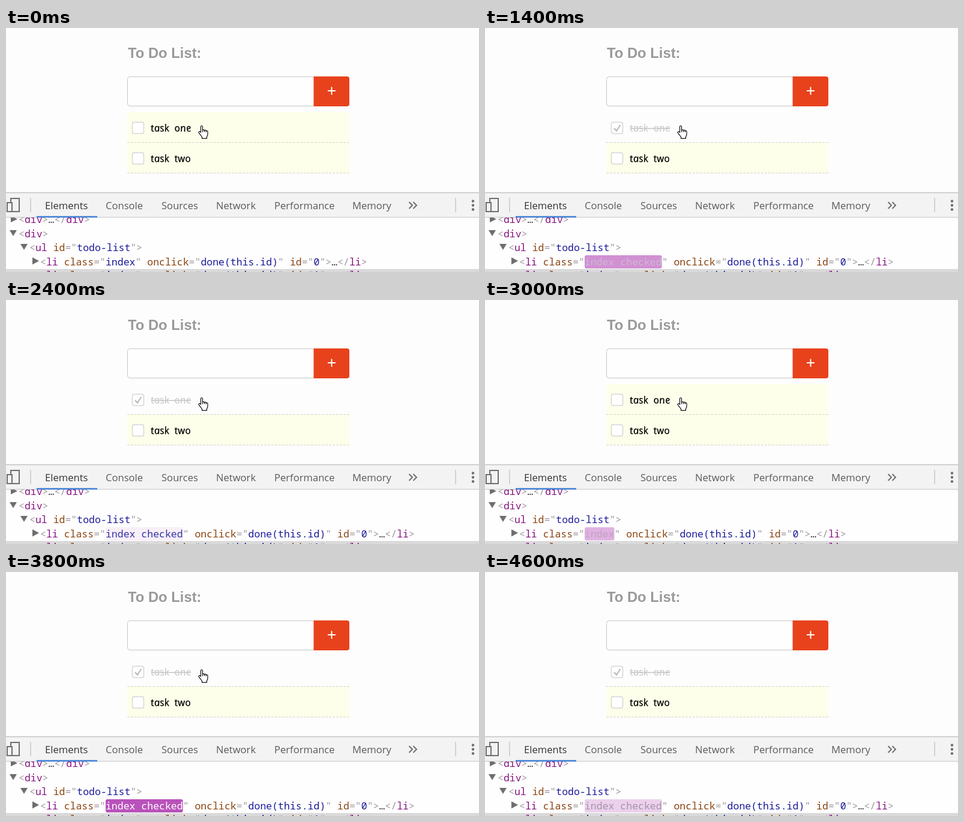
Animation of 788x408 px, one loop 4800 ms. Source, as an HTML page:

```html
<!DOCTYPE html>
<html lang="en">
<head>
<meta charset="utf-8">
<title>To do list with element inspector</title>
<style>
  html, body { margin: 0; width: 100%; height: 100%; overflow: hidden; background: #fdfdfd; }
  svg { display: block; width: 788px; height: 408px; }
  text { white-space: pre; }
  .title { font: bold 23.8px "Liberation Sans", Arial, sans-serif; fill: #999; }
  /* Upright italic gives round, handwritten letters */
  .task { font: italic 16.5px "Open Sans", sans-serif; letter-spacing: .3px; word-spacing: 4px; fill: #000; stroke: currentColor; stroke-width: .3; }
  .tabs { font: 16.6px "Open Sans", "Noto Sans", sans-serif; fill: #5a5a5a; }
  .tabs .on { fill: #333; }
  .code { font: 16.5px "Noto Sans Mono", monospace; fill: #9c969c; }
  .tag { fill: #881280; }
  .attr { fill: #8a4310; }
  .val { fill: #1a1a9a; }
  .dots { fill: #333; }
  .box { fill: #fff; stroke: #d6d6d6; stroke-width: 1.5; }
  .dash { stroke: #d6d6c2; stroke-dasharray: 4 2; }
  .line { fill: none; stroke: #6e6e6e; stroke-width: 2; }
</style>
</head>
<body>
<svg viewBox="0 0 788 408">
  <!-- page -->
  <text class="title" x="203" y="50">To Do List:</text>
  <rect x="202.5" y="81.5" width="320" height="49" rx="4" fill="#fefefe" stroke="#c6c6c6"/>
  <path d="M512.500 81h55.500a4 4 0 0 1 4 4v42a4 4 0 0 1-4 4h-55.500z" fill="#e8421c"/>
  <path d="M536 105h13M542.500 98.500v13" stroke="#fff" stroke-width="2"/>

  <rect id="row" x="202" y="141" width="370" height="50" fill="#feffea"/>
  <rect x="202" y="192" width="370" height="50" fill="#feffea"/>
  <path class="dash" d="M202 191.500h370M202 242.500h370"/>
  <rect class="box" x="210.5" y="157.5" width="19" height="19" rx="3"/>
  <rect class="box" x="210.5" y="208.5" width="19" height="19" rx="3"/>
  <text class="task" id="task" transform="translate(242 173) skewX(10)">task one</text>
  <text class="task" transform="translate(242 224) skewX(10)">task two</text>
  <g id="done" fill="none" stroke="#c6c6c6">
    <path d="M215 167.500l4 4.500 6.500-10" stroke="#b8b8b8" stroke-width="2"/>
    <path d="M242 168h66" stroke-width="1.500"/>
  </g>

  <!-- element tree -->
  <rect y="317" width="788" height="91" fill="#fefefe"/>
  <rect y="403" width="788" height="5" fill="#dadada"/>
  <path d="M8 314l11 5.500-11 5.500zM6 338h12l-6 10zM24 361h12l-6 10zM44 383.500l11 6-11 6z" fill="#6e6e6e"/>
  <rect id="flash" x="166" y="380" height="22" rx="3" fill="#ab30ac"/>
  <g class="code">
    <text x="21" y="326">&lt;<tspan class="tag">div</tspan>&gt;<tspan class="dots">…</tspan>&lt;/<tspan class="tag">div</tspan>&gt;</text>
    <text x="21" y="350">&lt;<tspan class="tag">div</tspan>&gt;</text>
    <text x="39" y="373">&lt;<tspan class="tag">ul</tspan> <tspan class="attr">id</tspan>="<tspan class="val">todo-list</tspan>"&gt;</text>
    <text x="57" y="397">&lt;<tspan class="tag">li</tspan> <tspan class="attr">class</tspan>="<tspan class="val" id="cls">index</tspan>" <tspan class="attr">onclick</tspan>="<tspan class="val">done(this.id)</tspan>" <tspan class="attr">id</tspan>="<tspan class="val">0</tspan>"&gt;<tspan class="dots">…</tspan>&lt;/<tspan class="tag">li</tspan>&gt;</text>
    <text x="57" y="419">&lt;<tspan class="tag">li</tspan> <tspan class="attr">class</tspan>="<tspan class="val">index</tspan>" <tspan class="attr">onclick</tspan>="<tspan class="val">done(this.id)</tspan>" <tspan class="attr">id</tspan>="<tspan class="val">1</tspan>"&gt;<tspan class="dots">…</tspan>&lt;/<tspan class="tag">li</tspan>&gt;</text>
  </g>

  <!-- toolbar -->
  <rect y="275" width="788" height="42" fill="#f3f3f3"/>
  <path d="M0 275.500h788" stroke="#b0b0b0"/>
  <path d="M0 316.500h788" stroke="#c4c4c4"/>
  <rect x="51" y="314.500" width="101" height="2.500" fill="#3f7fd6"/>
  <path d="M41 284v24M749 284v24" stroke="#c8c8c8" stroke-width="1.500"/>
  <path class="line" d="M8 291v-6h14v22h-11M2 292h8v15h-8z"/>
  <path class="line" d="M671.500 291l5.500 5.500-5.500 5.500M678.500 291l5.500 5.500-5.500 5.500"/>
  <g fill="#6e6e6e"><circle cx="778" cy="289.500" r="2.200"/><circle cx="778" cy="296.500" r="2.200"/><circle cx="778" cy="303.500" r="2.200"/></g>
  <g class="tabs">
    <text class="on" x="65" y="303">Elements</text>
    <text x="166" y="303">Console</text>
    <text x="259" y="303">Sources</text>
    <text x="350" y="303">Network</text>
    <text x="447" y="303">Performance</text>
    <text x="577" y="303">Memory</text>
  </g>

  <!-- pointer -->
  <g id="hand" stroke="#111" stroke-width="1.200" stroke-linejoin="round">
    <path fill="#fff" d="M324.500 165q0-1.500 1.500-1.500t1.500 1.500v5.500q1.500-1 3 .5 1.500-.800 2.800.700 2.700-.500 2.700 2v4q0 2-1.500 4v3h-8v-2.500l-5-6.500q-1-2 .5-2.500 1.200-.300 2.500 1.500z"/>
    <path fill="none" d="M327.500 170.500v3.500M330.500 171v3M333.300 171.700v2.500"/>
  </g>
</svg>
<script>
const LOOP = 4800, STEP = 200, CHAR = 9.9;
const [row, task, done, flash, cls, hand] =
  ['row', 'task', 'done', 'flash', 'cls', 'hand'].map(id => document.getElementById(id));

// Fade of the changed attribute, one entry per step since the change
const glow = [.83, .53, .37, .28, .22, .13, .07];
const ink = ['#fff', '#cdb9d4', '#bfa2c2', '#b09bb5', '#a594ab', '#6c64a8', '#3434a4'];
const changes = [1200, 2600, 3800];

const show = (el, on) => el.style.visibility = on ? 'visible' : 'hidden';
const within = (t, a, b) => t >= a && t < b;

function draw(now) {
  const t = Math.floor(now % LOOP / STEP) * STEP;
  const checked = within(t, 800, 2600) || t >= 3800;
  show(row, !checked);
  show(done, checked);
  task.style.fill = task.style.color = checked ? '#cdcdcd' : '#000';

  const name = within(t, 1200, 2600) || t >= 3800 ? 'index checked' : 'index';
  if (cls.textContent !== name) cls.textContent = name;
  const last = changes.filter(c => c <= t).pop();
  const age = (t - last) / STEP;
  flash.setAttribute('width', name.length * CHAR);
  flash.style.opacity = glow[age] || 0;
  cls.style.fill = ink[age] || '#1a1a9a';

  show(hand, t < 4400);
}

const start = performance.now();
function tick() {
  draw(performance.now() - start);
  requestAnimationFrame(tick);
}
tick();
</script>
</body>
</html>
```
